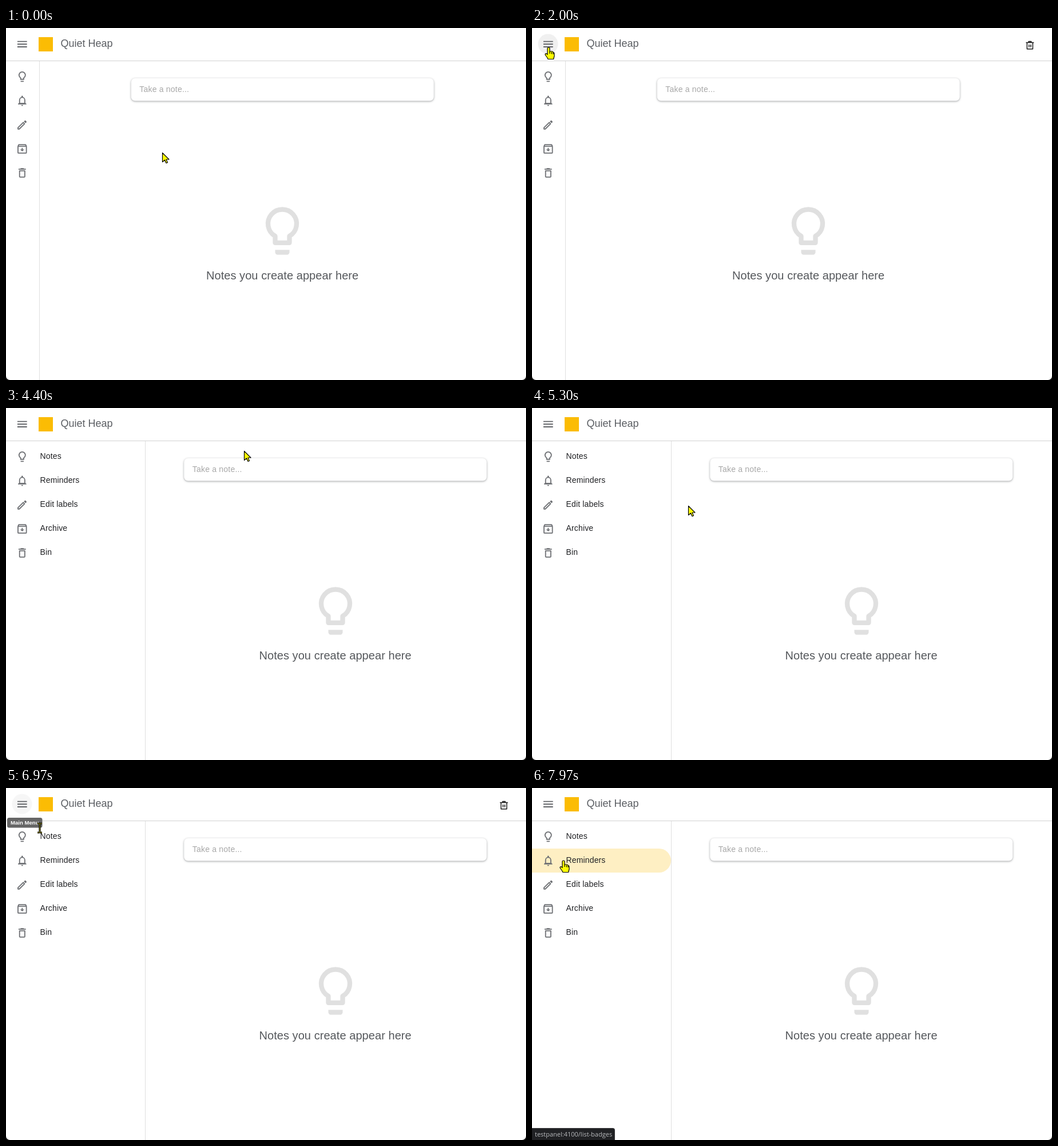
An HTML page with a canvas that plays this animation: 909x616 px, repeating every 8 s.

```html
<!DOCTYPE html>
<html lang="en">
<head>
<meta charset="utf-8">
<title>Notes</title>
<style>
  html, body { margin: 0; width: 100%; height: 100%; overflow: hidden; background: #000; }
  canvas { display: block; width: 909px; height: 616px; }
</style>
</head>
<body>
<canvas id="stage"></canvas>
<script>
const W = 909, H = 616, LOOP = 8000;
const SANS = '"Liberation Sans", Arial, sans-serif';
const canvas = document.getElementById('stage');
const ctx = canvas.getContext('2d');
const dpr = window.devicePixelRatio || 1;
canvas.width = W * dpr;
canvas.height = H * dpr;

// Pointer gestures: start time, end time, destination
const home = { x: 273, y: 218 };
const menuSpot = [29, 34];
const moves = [
  [200, 270, 283, 231],
  [470, 730, 294, 269],
  [870, 1300, 126, 16],
  [1530, 1800, ...menuSpot],
  [3560, 3800, 388, 13],
  [3900, 4130, 400, 67],
  [4330, 4700, 569, 150],
  [4700, 5070, 400, 178],
  [5230, 5300, 273, 171],
  [5300, 6030, 66, 16],
  [6070, 6350, ...menuSpot],
  [6830, 6970, 59, 70],
  [6970, 7570, 58, 228],
  [7600, 7970, 55, 127]
];

// Each icon lives in a 24 unit box: stroked part, filled part
const shape = (line, fill) => ({ line: new Path2D(line), fill: new Path2D(fill) });
const icons = {
  menu: shape('', 'M3 6h18v2H3zM3 11h18v2H3zM3 16h18v2H3z'),
  bulb: shape('M9 17v-2.8a6 6 0 1 1 6 0V17z',
    'M9 20h6v1a1 1 0 0 1-1 1h-4a1 1 0 0 1-1-1z'),
  bell: shape('M7 17v-6a5 5.5 0 0 1 10 0v6',
    'M4 19v-1l2-2h12l2 2v1zM10.5 6V4a1.5 1.5 0 0 1 3 0v2zM10 20h4a2 2 0 0 1-4 0z'),
  pencil: shape('M4 20v-2.5L14 7.5l2.5 2.5L6.5 20z',
    'M15.2 5.7l1.7-1.7q.8-.8 1.6 0l1.6 1.6q.8.8 0 1.6L18.4 8.9z'),
  archive: shape('M4 7h16V19a1 1 0 0 1-1 1H5a1 1 0 0 1-1-1zM4 7L5.5 4h13L20 7',
    'M11 10h2v3h3l-4 4-4-4h3z'),
  bin: shape('M7 8h10v11a1 1 0 0 1-1 1H8a1 1 0 0 1-1-1z',
    'M5 4h3.5l1-1h5l1 1H19v2H5z'),
  trash: shape('M3 6.5h18M9 6V4h6v2M5.5 7v14h13V7M10 11v6M14 11v6', '')
};
const rows = [['Notes', 'bulb'], ['Reminders', 'bell'], ['Edit labels', 'pencil'],
  ['Archive', 'archive'], ['Bin', 'bin']];

const arrow = new Path2D('M.5.5V16.5L4.5 13L7 18.5L9.5 17.5L7 12H12Z');
const hand = new Path2D('M-2 1.5Q-2 0 0 0Q2 0 2 1.5V7Q8 6 8.2 9Q10 8.6 10 11V15L8.6 20.5H-1Q-2 18-4.8 14.5Q-6.8 12-5.4 11Q-4 10-2 12.5Z');
const knuckles = new Path2D('M2 7v4M5.4 8v3.5M8.2 9v3');
const beam = new Path2D('M-4-8h2.5L0-7L1.5-8H4M0-7V7M-4 8h2.5L0 7L1.5 8H4');

const clamp = v => Math.max(0, Math.min(1, v));
const ramp = (t, a, b) => clamp((t - a) / (b - a));
const smooth = p => p * p * (3 - 2 * p);
const pulse = (t, on, off) => ramp(t, on, on + 110) - ramp(t, off, off + 110);

function pointer(t) {
  let { x, y } = home;
  for (const [a, b, toX, toY] of moves) {
    const p = smooth(ramp(t, a, b));
    x += (toX - x) * p;
    y += (toY - y) * p;
  }
  return { x, y };
}

const sideWidth = t => 58 + 185 * smooth(ramp(t, 3030, 3450));
const inHeader = t => pointer(t).y < 57;

function onMenu(t) {
  const p = pointer(t);
  return Math.hypot(p.x - 28, p.y - 28) < 18;
}

function rowAt(t) {
  const p = pointer(t);
  return p.x < sideWidth(t) && p.y >= 76 ? Math.floor((p.y - 64) / 42) : -1;
}

// Share of the last `span` ms for which a test held: a linear fade in and out
function fade(test, t, span) {
  const n = 25;
  let hits = 0;
  for (let i = 0; i < n; i++) if (test(t - span * i / n)) hits++;
  return hits / n;
}

function text(str, x, y, size, color, gap = 0, font = SANS, weight = 'normal') {
  ctx.font = `${weight} ${size}px ${font}`;
  ctx.letterSpacing = gap + 'px';
  ctx.fillStyle = color;
  ctx.fillText(str, x, y);
}

function box(x, y, w, h, r, color) {
  ctx.beginPath();
  ctx.roundRect(x, y, w, h, r);
  ctx.fillStyle = color;
  ctx.fill();
}

function icon(name, cx, cy, size, color) {
  const s = size / 24;
  ctx.save();
  ctx.translate(cx - size / 2, cy - size / 2);
  ctx.scale(s, s);
  ctx.lineWidth = 2;
  ctx.lineJoin = 'round';
  ctx.strokeStyle = ctx.fillStyle = color;
  ctx.stroke(icons[name].line);
  ctx.fill(icons[name].fill);
  ctx.restore();
}

function drawHeader(t) {
  ctx.fillStyle = '#d2d2d2';
  ctx.fillRect(0, 57, W, 1);
  ctx.globalAlpha = fade(onMenu, t, 250);
  box(10.5, 10.5, 35, 35, 17.5, '#f0f0f0');
  ctx.globalAlpha = 1;
  icon('menu', 28.3, 28.3, 22.4, '#616367');
  box(57, 16, 25, 25, 0, '#fbbc04');
  text('Quiet Heap', 95.5, 33, 18, '#5a5d62');
  if (inHeader(t - 65)) icon('trash', 870.4, 29.8, 18.5, '#1c1c1c');
}

function drawSide(t, side) {
  ctx.save();
  ctx.beginPath();
  ctx.rect(0, 58, side, H);
  ctx.clip();
  rows.forEach(([label, name], i) => {
    const y = 64 + 42 * i;
    ctx.globalAlpha = fade(s => rowAt(s) === i, t, 90);
    box(0, y, side, 42, [0, 21, 21, 0], '#feefc3');
    ctx.globalAlpha = 1;
    icon(name, 28.3, y + 21.2 + i * 0.1, 22, '#6e7074');
    text(label, 59.6, y + 25, 14, '#202124', 0.135);
  });
  ctx.restore();
  ctx.fillStyle = '#dfdfdf';
  ctx.fillRect(side, 58, 1, H - 58);
}

function drawContent(side) {
  const cx = (side + W) / 2;
  ctx.save();
  ctx.shadowColor = 'rgba(60,64,67,.5)';
  ctx.shadowBlur = 3.5 * dpr;
  ctx.shadowOffsetY = dpr;
  box(cx - 264.75, 88, 529, 39.5, 7, '#fff');
  ctx.restore();
  text('Take a note...', cx - 250.2, 112, 14, '#a8a8a8', 0.2);
  icon('bulb', Math.floor(cx), 355, 100, '#e0e0e0');
  ctx.textAlign = 'center';
  text('Notes you create appear here', cx - 0.4, 440, 20, '#55585c', 0.06);
  ctx.textAlign = 'left';
}

function drawTip(t) {
  ctx.globalAlpha = pulse(t, 2070, 3600) + pulse(t, 6480, 7010);
  box(2, 52, 61.5, 17.5, 3.5, '#666');
  text('Main Menu', 8, 64, 9.6, '#fff', 0, SANS, 'bold');
  ctx.globalAlpha = 1;
}

function drawStatus() {
  box(0, 595, 145, 21, [0, 4, 0, 0], '#3c3c3f');
  box(0, 596, 144, 20, [0, 3, 0, 0], '#202124');
  text('testpanel:4100/list-badges', 5, 610, 11, '#b9bbbe', 0, '"Open Sans", sans-serif');
}

function drawPointer(t, side) {
  const { x, y } = pointer(t);
  const cx = (side + W) / 2;
  const inInput = Math.abs(x - cx) < 264 && y > 88 && y < 128;
  const overText = x < side && y > 57 && y < 76;
  ctx.save();
  ctx.translate(Math.round(x), Math.round(y));
  ctx.lineJoin = 'round';
  ctx.strokeStyle = '#000';
  ctx.fillStyle = '#ff0';
  ctx.lineWidth = 1.2;
  if (inInput || overText) {
    ctx.lineWidth = 3.2;
    ctx.stroke(beam);
    ctx.lineWidth = 1;
    ctx.strokeStyle = '#a59c22';
    ctx.stroke(beam);
  } else if (onMenu(t) || rowAt(t) >= 0) {
    ctx.fill(hand);
    ctx.stroke(hand);
    ctx.stroke(knuckles);
  } else {
    ctx.fill(arrow);
    ctx.stroke(arrow);
  }
  ctx.restore();
}

function draw(t) {
  const side = sideWidth(t);
  ctx.setTransform(dpr, 0, 0, dpr, 0, 0);
  ctx.fillStyle = '#111';
  ctx.fillRect(0, 0, W, H);
  ctx.save();
  ctx.beginPath();
  ctx.roundRect(0, 0, W, H, [0, 0, 7, 7]);
  ctx.clip();
  ctx.fillStyle = '#fff';
  ctx.fillRect(0, 0, W, H);
  drawContent(side);
  drawSide(t, side);
  drawHeader(t);
  drawTip(t);
  ctx.restore();
  if (t > 7800) drawStatus();
  drawPointer(t, side);
}

const start = performance.now();
function tick() {
  draw((performance.now() - start) % LOOP);
  requestAnimationFrame(tick);
}
tick();
</script>
</body>
</html>
```
